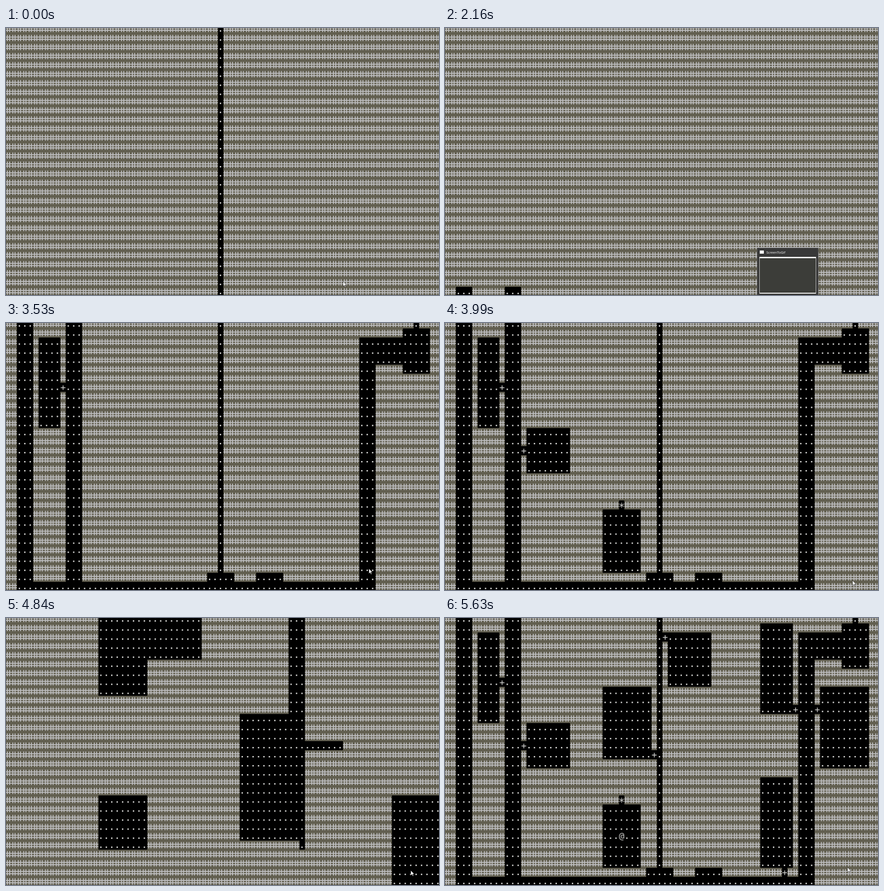
Recreate the animation shown at these times as an HTML page with a canvas. Size 952 by 588 pixels, loop 7870 ms.

```html
<!DOCTYPE html>
<html lang="en">
<head>
<meta charset="utf-8">
<title>Dungeon generator</title>
<style>
  html, body { margin: 0; width: 100%; height: 100%; overflow: hidden; background: #625f50; }
  canvas { display: block; }
</style>
</head>
<body>
<canvas id="stage" width="952" height="588"></canvas>
<script>
const ctx = document.getElementById('stage').getContext('2d');
const LOOP = 7870, COLS = 80, ROWS = 30, CELL_W = 12, CELL_H = 20;
const WALL = '#625f50', INK = '#c0c0c2';

// The map is drawn on whole pixels, then scaled slightly onto the stage.
const board = document.createElement('canvas');
board.width = 956;
board.height = 590;
const map = board.getContext('2d');
const TOP = -8;

// Map edits: each returns a function that changes the grid.
const rect = (ch, c0, r0, c1, r1) => grid => {
  for (let r = r0; r <= r1; r++) for (let c = c0; c <= c1; c++) grid[r][c] = ch;
};
const floor = (...box) => rect('.', ...box);
const put = (ch, c, r) => rect(ch, c, r, c, r);
const door = (c, r) => put('+', c, r);
const clear = rect('#', 0, 0, COLS - 1, ROWS - 1);
const all = (...edits) => grid => edits.forEach(edit => edit(grid));
const shafts = top => all(floor(2, top, 4, 29), floor(11, top, 13, 29));

const roads = all(
  shafts(0), floor(2, 29, 67, 29), floor(73, 1, 77, 5), floor(65, 2, 67, 29),
  floor(37, 28, 41, 29), floor(46, 28, 50, 29), floor(68, 2, 72, 4),
  floor(39, 0, 39, 27), floor(75, 0, 75, 0));
const rooms = [
  all(floor(6, 2, 9, 11), door(10, 7)),
  all(floor(15, 12, 22, 16), door(14, 14)),
  all(floor(29, 21, 35, 27), put('*', 32, 20)),
  all(floor(58, 1, 63, 10), door(64, 10)),
  all(floor(69, 8, 77, 16), door(68, 10)),
  all(floor(41, 2, 48, 7), door(40, 2)),
  all(floor(29, 8, 37, 15), door(38, 15)),
  all(floor(58, 18, 63, 27), door(62, 28))
];
const caveA = all(floor(17, 0, 35, 4), floor(17, 5, 25, 8), floor(17, 20, 25, 25));
const caveB = all(floor(52, 0, 54, 10), floor(43, 11, 54, 24), floor(55, 14, 61, 14), put('.', 54, 25));
const caveC = floor(71, 20, 79, 29);

const steps = [
  [0, all(clear, floor(39, 0, 39, 29))],
  [80, floor(12, 15, 12, 29)],
  [160, floor(12, 0, 12, 29)],
  [230, floor(3, 15, 3, 29)],
  [310, floor(3, 0, 3, 29)],
  [390, floor(66, 17, 66, 29)],
  [460, floor(66, 4, 66, 29)],
  [540, floor(75, 0, 75, 3)],
  [610, all(put(' ', 66, 3), floor(67, 3, 74, 3))],
  [690, floor(76, 3, 79, 3)],
  [920, rect('#', 76, 3, 79, 3)],
  [1070],
  [1620, put('.', 66, 3)],
  [1770, clear], [1850], [1930], [2000], [2080],
  [2160, shafts(29)],
  [2220, shafts(24)],
  [2310, shafts(18)],
  [2390, shafts(12)],
  [2460, shafts(6)],
  [2540, shafts(0)],
  [2620, floor(5, 29, 10, 29)],
  [2700, floor(73, 1, 77, 5)],
  [2770, floor(65, 2, 67, 4)],
  [2850, floor(37, 28, 41, 29)],
  [2920, floor(46, 28, 50, 29)],
  [2990, floor(14, 29, 36, 29)],
  [3070, floor(42, 29, 45, 29)],
  [3150, floor(51, 29, 67, 29)],
  [3220, floor(65, 5, 67, 28)],
  [3300, floor(68, 2, 72, 4)],
  [3370, all(floor(39, 0, 39, 27), floor(75, 0, 75, 0))],
  [3440], [3520, rooms[0]], [3600], [3680, rooms[1]], [3750], [3830, rooms[2]], [3910], [3990],
  [4070, rooms[3]],
  [4140, rooms[4]],
  [4220, rooms[5]],
  [4300, rooms[6]],
  [4380],
  [4530, rooms[7]],
  [4690, all(clear, caveA)],
  [4760, caveB],
  [4840, caveC],
  [4930], [5000], [5080], [5160], [5240],
  [5320, clear],
  [5470, all(roads, ...rooms)],
  [5550, put('@', 32, 24)],
  [5630]
];

// Pointer path: time, x, y. It leaves the stage below the bottom edge.
const path = [
  [0, 741, 558], [690, 773, 587], [1069, 773, 587], [1070, 773, 600],
  [2700, 773, 600], [2920, 621, 505], [3150, 640, 500], [3750, 896, 567],
  [4220, 896, 567], [4840, 890, 556], [5470, 890, 556], [5630, 885, 549], [LOOP, 885, 549]
];
const pointerAt = t => {
  const i = path.findIndex(p => p[0] > t);
  const [t0, x0, y0] = path[i - 1], [t1, x1, y1] = path[i];
  const k = (t - t0) / (t1 - t0);
  return [Math.round(x0 + (x1 - x0) * k), Math.round(y0 + (y1 - y0) * k)];
};

function drawWall(x, y) {
  map.fillStyle = INK;
  map.fillRect(x + 2, y + 3, 2, 14);
  map.fillRect(x + 7, y + 3, 2, 14);
  map.fillRect(x, y + 7, CELL_W, 2);
  map.fillRect(x, y + 12, CELL_W, 2);
}

function drawGlyph(ch, x, y) {
  map.font = (ch === '*' ? 24 : 20) + 'px "DejaVu Sans Mono", monospace';
  map.textAlign = 'center';
  const m = map.measureText(ch);
  const mid = (m.actualBoundingBoxAscent - m.actualBoundingBoxDescent) / 2;
  map.fillText(ch, x + 6, y + 10.7 + mid);
}

function drawMap(grid) {
  map.fillStyle = WALL;
  map.fillRect(0, 0, board.width, board.height);
  for (let r = 0; r < ROWS; r++) for (let c = 0; c < COLS; c++) {
    const ch = grid[r][c], x = c * CELL_W, y = TOP + r * CELL_H;
    if (ch === '#') { drawWall(x, y); continue; }
    map.fillStyle = '#000';
    map.fillRect(x, y, CELL_W, CELL_H);
    map.fillStyle = '#d4d4d2';
    if (ch === '.') map.fillRect(x + 4, y + 13, 3, 3);
    else if (ch !== ' ') drawGlyph(ch, x, y);
  }
  ctx.drawImage(board, 0, 0, 952, 588);
}

function drawPreview(t) {
  if (t < 1930 || t >= 3220) return;
  ctx.save();
  ctx.globalAlpha = Math.min(1, (t - 1850) / 300, (3300 - t) / 240);
  ctx.fillStyle = '#383838';
  ctx.fillRect(686, 484, 135, 104);
  ctx.strokeStyle = '#555';
  ctx.strokeRect(686.5, 484.5, 134, 110);
  ctx.fillStyle = '#fff';
  ctx.fillRect(692, 490, 9, 7);
  ctx.font = '7.5px "Open Sans", sans-serif';
  ctx.textAlign = 'left';
  ctx.fillText('ScreenToGif', 706.5, 497);
  ctx.fillStyle = '#3c3d39';
  ctx.fillRect(691, 504, 125, 82);
  if (t >= 2460) {
    ctx.fillStyle = '#2b2b2a';
    ctx.fillRect(777, 569, 34, 14);
  }
  ctx.fillStyle = '#fff';
  ctx.fillRect(691, 504, 125, 3);
  ctx.fillRect(691, 583, 125, 2);
  ctx.fillStyle = '#c8c8c8';
  ctx.fillRect(691, 504, 1, 81);
  ctx.fillRect(815, 504, 1, 81);
  ctx.restore();
}

const arrow = new Path2D('M0 0V11L2.6 8.6L4.4 12.4L6 11.7L4.3 8H7.6Z');
function drawPointer(x, y) {
  ctx.save();
  ctx.translate(x, y);
  ctx.fillStyle = '#fff';
  ctx.strokeStyle = '#222';
  ctx.lineWidth = 0.7;
  ctx.fill(arrow);
  ctx.stroke(arrow);
  ctx.restore();
}

function render(index) {
  const grid = Array.from({ length: ROWS }, () => Array(COLS).fill('#'));
  for (let i = 0; i <= index; i++) if (steps[i][1]) steps[i][1](grid);
  const t = steps[index][0];
  drawMap(grid);
  drawPreview(t);
  drawPointer(...pointerAt(t));
}

let shown = -1;
const start = performance.now();
function tick() {
  const t = (performance.now() - start) % LOOP;
  const index = steps.filter(s => s[0] <= t).length - 1;
  if (index !== shown) render(shown = index);
  requestAnimationFrame(tick);
}
tick();
</script>
</body>
</html>
```
